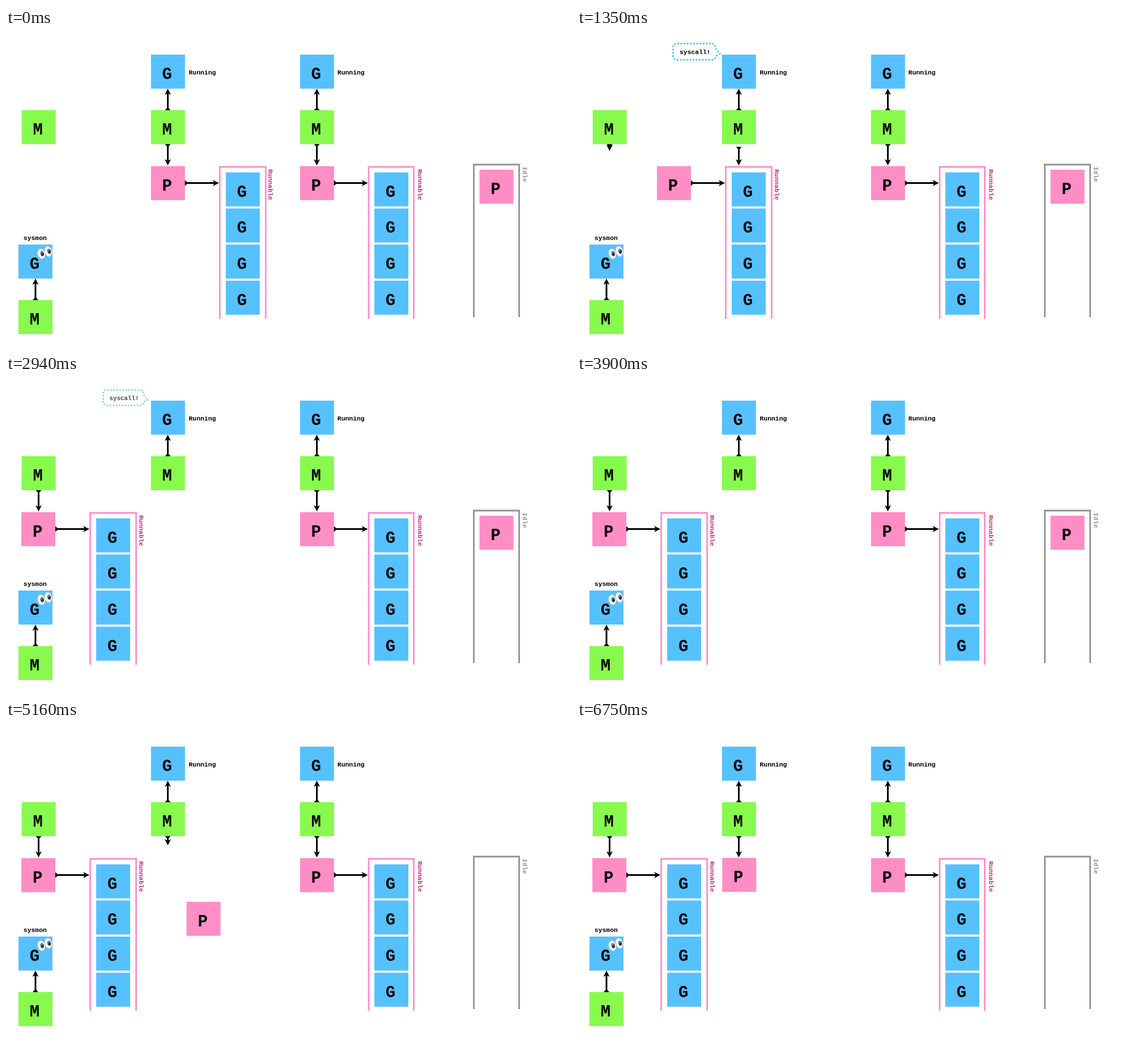
Animation of 997x561 px, one loop 6.78 s. Source, as an HTML page:

```html
<!DOCTYPE html>
<html lang="en">
<head>
<meta charset="utf-8">
<title>Scheduler handoff</title>
<style>
html, body { margin: 0; width: 100%; height: 100%; overflow: hidden; background: #fff; }
svg { display: block; width: 997px; height: 561px; }
text { font: bold 11.4px "Liberation Mono", monospace; white-space: pre; }
.letter { font-size: 29px; text-anchor: middle; }
</style>
</head>
<body>
<svg id="stage" viewBox="0 0 997 561"></svg>
<script>
const LOOP = 6780;
const BLUE = '#56c1ff', GREEN = '#88fa4e', PINK = '#ff8dc6', MAGENTA = '#cb297b', GREY = '#929292';
const FILL = { G: BLUE, M: GREEN, P: PINK };

const box = (kind, x, y) =>
  `<rect x="${x}" y="${y}" width="60" height="60" fill="${FILL[kind]}"/>
   <text class="letter" x="${x + 28.5}" y="${y + 43}">${kind}</text>`;

const label = (x, y, str) => `<text x="${x}" y="${y}">${str}</text>`;

const sideLabel = (x, y, str, color) =>
  `<text transform="translate(${x} ${y}) rotate(90)" fill="${color}">${str}</text>`;

// Arrow with a flat-ended tail and a swept head, drawn along +x and then turned
function arrow(x, y, angle, len) {
  return `<g transform="translate(${x} ${y}) rotate(${angle})">
    <path d="M0 0H${Math.max(0, len - 7)}" stroke="#000" stroke-width="3"/>
    <path d="M0-5L5.5 0L0 5ZM${len} 0l-11-5.5l3 5.5l-3 5.5Z"/></g>`;
}

const rail = (left, right, top, bottom, color) =>
  `<path d="M${left} ${bottom}V${top}M${right} ${bottom}V${top}M${left - 1.5} ${top}H${right + 1.5}"
    fill="none" stroke="${color}" stroke-width="2.8"/>`;

// A processor with its queue of runnable tasks
function queue(px, left, right, gx, textX) {
  const tasks = [0, 1, 2, 3].map(i => box('G', gx, 254.7 + i * 63.7)).join('');
  return box('P', px, 243.7) + arrow(px + 60, 273.4, 0, left - px - 61.5) +
    rail(left, right, 245, 513, PINK) + tasks + sideLabel(textX, 249, 'Runnable', MAGENTA);
}

const eye = (x, y) =>
  `<g transform="translate(${x} ${y}) rotate(-14)">
    <ellipse rx="6.2" ry="9" fill="#f8f8f8" stroke="#d5dade" stroke-width=".8"/>
    <ellipse cx="1.6" cy=".3" rx="2.9" ry="4.3" fill="#333"/>
    <circle cx="1" cy="-1.5" r="1" fill="#fff"/></g>`;

const bubble =
  `<path d="M177 27.5H238Q244.5 28 245.5 38L252 45.5L246 49Q244.5 56 237 56H177
    Q169.500 56 169.500 48V35Q169.500 27.500 177 27.500Z"
    fill="#fff" stroke="${BLUE}" stroke-width="2.9" stroke-dasharray="3 2.6"/>` +
  label(181, 46, 'syscall!');

const $ = id => document.getElementById(id);

$('stage').innerHTML =
  '<g id="newLink"></g><g id="oldLink"></g><g id="idleLink"></g>' +
  arrow(285.5, 145, -90, 38) + arrow(548.5, 145, -90, 38) +
  arrow(548.5, 205, 90, 37.5) + arrow(52, 480, -90, 38) +
  box('M', 27.7, 145) +
  box('G', 255.8, 47) + box('M', 255.8, 145) + label(322.5, 82, 'Running') +
  box('G', 518.8, 47) + box('M', 518.8, 145) + label(584.8, 82, 'Running') +
  queue(518.8, 640, 719.5, 650, 726.7) +
  label(30.8, 374, 'sysmon') + box('G', 22, 382) + eye(62.3, 398.3) + eye(74.6, 394) +
  box('M', 22, 480) +
  `<g id="group">${queue(255.8, 377.3, 458.3, 387.8, 463.3)}</g>` +
  rail(825.5, 905.5, 241, 510, GREY) + sideLabel(911.8, 244.5, 'Idle', GREY) +
  `<g id="idleP">${box('P', 0, 0)}</g><g id="bubble">${bubble}</g>`;

const progress = (t, start, span) => Math.min(1, Math.max(0, (t - start) / span));
const ease = u => (1 - Math.cos(Math.PI * u)) / 2;
const bezier = (u, a, b, c, d) => {
  const v = 1 - u;
  return v * v * v * a + 3 * v * v * u * b + 3 * v * u * u * c + u * u * u * d;
};

const HANDOFF = 910, REFILL = 4531, LINK = 37.5;

// Link that grows downward out of an M box
function grow(x, age) {
  return age < 0 ? '' : arrow(x, 205, 90, Math.min(LINK, 2.2 + 0.0222 * age));
}

// Link whose tail runs down into its head until nothing is left
function shrink(x, age) {
  const cut = Math.max(0, 0.0243 * age - 6);
  return cut > LINK - 3 ? '' : arrow(x, 205 + cut, 90, LINK - cut);
}

function draw(t) {
  const shift = -228.7 * ease(progress(t, HANDOFF, 880));
  $('group').setAttribute('transform', `translate(${shift} 0)`);
  $('newLink').innerHTML = grow(57.5, t - HANDOFF);
  $('oldLink').innerHTML = shrink(285.5, t - HANDOFF);
  $('idleLink').innerHTML = grow(285.5, t - REFILL);

  const u = ease(progress(t, REFILL, 830));
  const x = bezier(u, 835.5, 708, 384, 256.3), y = bezier(u, 250, 465, 462, 243.2);
  $('idleP').setAttribute('transform', `translate(${x} ${y})`);

  const shown = progress(t, 100, 360) - progress(t, 2815, 430);
  const size = 0.83 + 0.17 * shown;
  $('bubble').setAttribute('opacity', shown);
  $('bubble').setAttribute('transform', `translate(210 42) scale(${size}) translate(-210 -42)`);
}

const began = performance.now();
function tick() {
  draw((performance.now() - began) % LOOP);
  requestAnimationFrame(tick);
}
tick();
</script>
</body>
</html>
```
